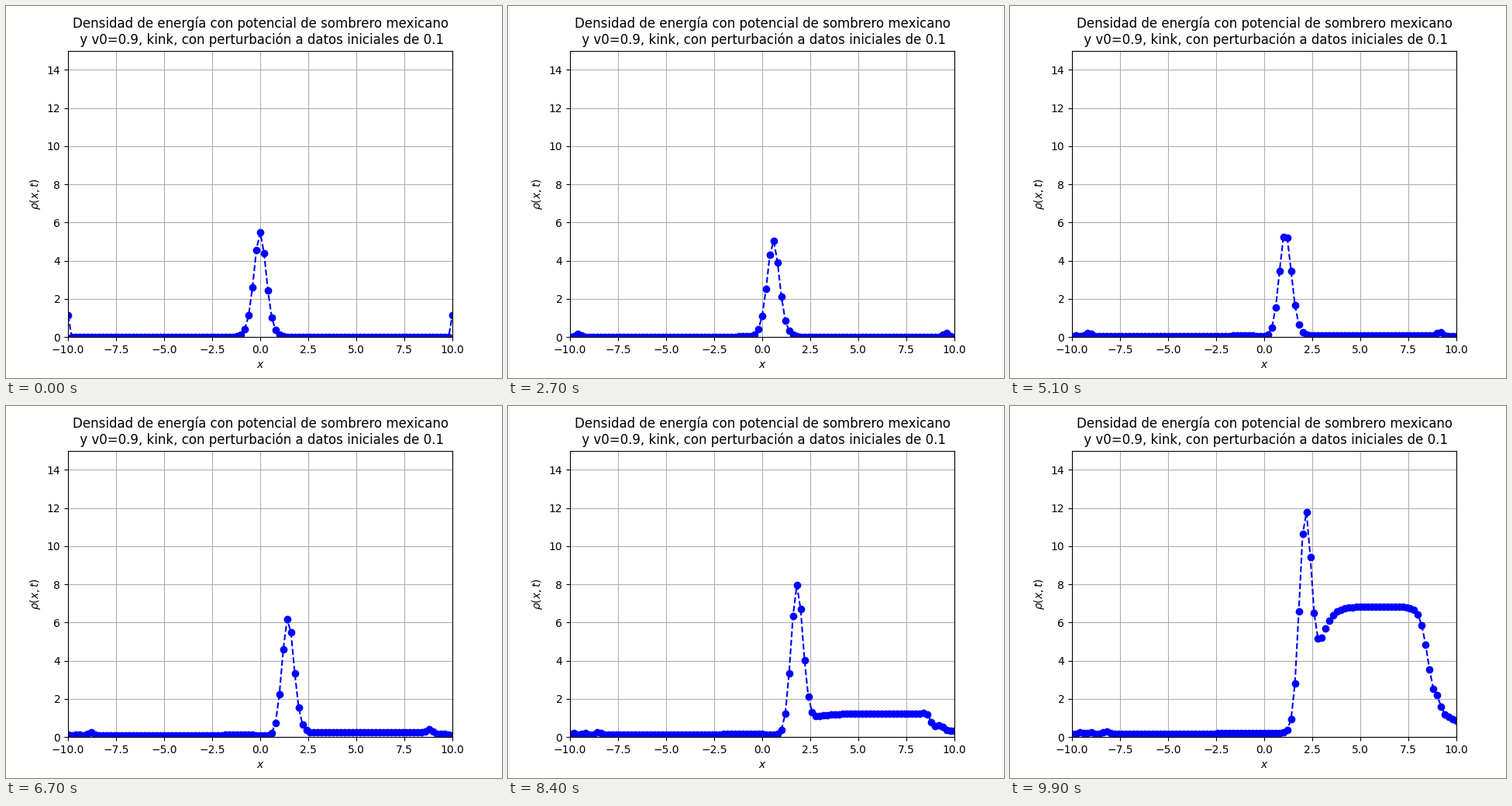
These frames come from a looping animation (640x480 px, 10 s). A matplotlib script:

```python
import numpy as np
import matplotlib.pyplot as plt
from matplotlib.animation import FuncAnimation

FRAMES = 100
LAST = FRAMES - 1


def logistic(z):
    return 1 / (1 + np.exp(-np.clip(z, -60, 60)))


def bump(x, x0, width=0.14):
    return np.exp(-0.5 * ((x - x0) / width) ** 2)


def kink(x, n, centre, lag):
    """Moving sech^4 peak that dips at first, then grows and sharpens."""
    height = 4.82 + 0.06 * np.exp(0.0458 * n) + 0.6 * np.exp(-(n / 13) ** 2)
    d = x - centre
    steep = np.where(d < 0, 0.25 * logistic((n - 47) / 4),
                     0.21 * np.exp((n - LAST) / 13))
    arg = (1.63 - 0.07 * lag) * d * (1 + steep * d * d)
    return height / np.cosh(np.clip(arg, -20, 20)) ** 4


def plateau(x, n, wall):
    """Runaway vacuum on the right, eaten away from the wall inwards."""
    high = 0.01 + 1 / np.sinh(0.585 + 0.0176 * (LAST - n)) ** 4
    tail = np.minimum(wall * (6 - 0.5 * x), high)
    steep = 10 - 5.2 * (n / LAST) ** 6
    return tail + (high - tail) * logistic(steep * (10 - 0.0151 * n - x))


def wall_waves(x, n, wall):
    """Spikes at both walls, the pulses they send in, and later ripples."""
    start = min(1, n / 8)
    front = 10 - 0.0182 * (n - 3.5)
    second = 10.6 - 0.0158 * n
    ripple = 0.53 * wall
    waves = 0.16 * start * bump(x, -front)
    waves += 0.2 * start * (1 - (n / LAST) ** 12) * bump(x, front)
    waves += ripple * bump(x, second)
    waves += min(ripple, 0.08) * (bump(x, -second) + bump(x, -second - 0.55))
    waves[[0, -1]] += 1.12 * np.exp(-n / 4)
    return waves


def density(x, n):
    lag = bump(n, 12, 8)
    centre = 0.0215 * n - 0.03 * lag
    low = 0.01 + 0.155 * (n / LAST) ** 2
    wall = 0.85 * np.exp(0.066 * (n - LAST))

    step = logistic(2.8 * (x - centre - 0.52))
    vacuum = low + (plateau(x, n, wall) - low) * step
    wake = (0.05 * min(1, n / 40) * logistic(10 * (x + 0.7 + 0.018 * n))
            * logistic(-7 * (x - centre + 1.7)))
    return vacuum + wake + wall_waves(x, n, wall) + kink(x, n, centre, lag)


x = np.linspace(-10, 10, 101)

fig, ax = plt.subplots(figsize=(6.4, 4.8), dpi=100)
ax.set_xlim(-10, 10)
ax.set_ylim(0, 15)
ax.set_title("Densidad de energía con potencial de sombrero mexicano\n"
             " y v0=0.9, kink, con perturbación a datos iniciales de 0.1")
ax.set_xlabel(r"$x$")
ax.set_ylabel(r"$\rho(x,t)$")
ax.grid(True)
line, = ax.plot(x, density(x, 0), "bo--")


def update(n):
    line.set_ydata(density(x, n))
    return line,


anim = FuncAnimation(fig, update, frames=FRAMES, interval=100,
                     repeat=True, repeat_delay=0)
plt.show()
```
